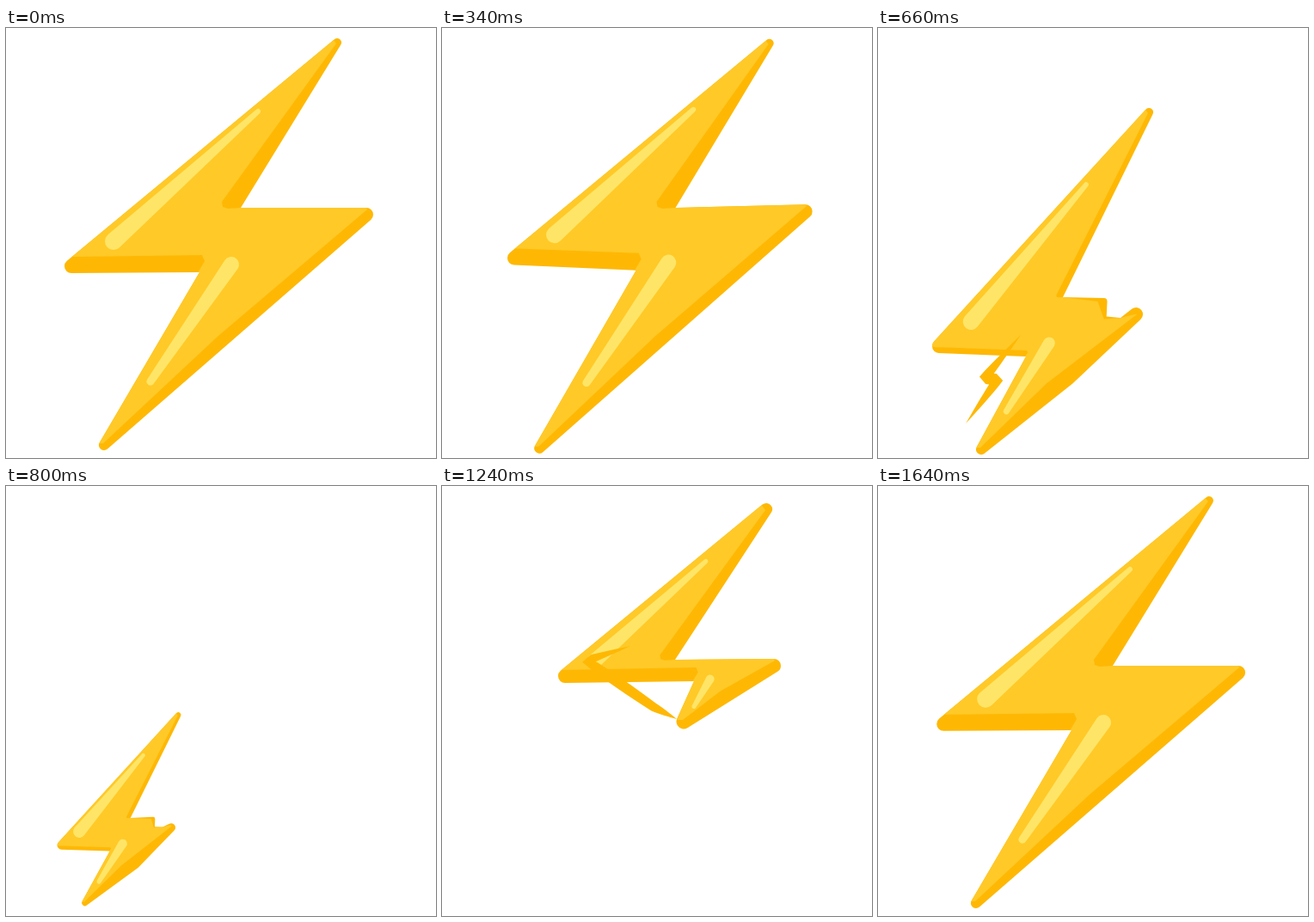
These frames come from a looping animation (500x500 px, 1660 ms). An HTML page with a canvas:

```html
<!DOCTYPE html>
<html lang="en">
<head>
<meta charset="utf-8">
<title>Lightning bolt</title>
<style>
  html, body { margin: 0; width: 100%; height: 100%; overflow: hidden; background: #fff; }
  canvas { display: block; width: 500px; height: 500px; }
</style>
</head>
<body>
<canvas id="stage" width="500" height="500"></canvas>
<script>
const ctx = document.getElementById('stage').getContext('2d');
const LOOP = 1660, STEP = 20, SPARK_LIFE = 200;
const DARK = '#feb804', BODY = '#ffc928', SHINE = '#ffe567';

const linear = p => p;
const easeIn = p => p * p;
const easeOut = p => 1 - (1 - p) * (1 - p);
const smooth = p => p * p * (3 - 2 * p);

const clamp = (v, a, b) => Math.max(a, Math.min(b, v));
const dist = (a, b) => Math.hypot(a[0] - b[0], a[1] - b[1]);
const add = ([x, y], dx, dy, r = 0) => [x + dx, y + dy, r];
const mix = (a, b, p) => Array.isArray(a) ? a.map((v, i) => mix(v, b[i], p)) : a + (b - a) * p;

// Pose: [size, tip, rim, bite], then top, notch, right, bottom, inner corner, left
const REST = [[1, 1, 1, 0], [385, 17], [273, 209], [419, 217], [114, 485], [225, 284], [76, 277]];

// Moves the corners of the resting bolt
const moved = (style, ...shifts) =>
  [style, ...shifts.map(([dx, dy], i) => add(REST[i + 1], dx, dy).slice(0, 2))];

// Shrinks a pose around its middle and puts that at a place
function shrunk([style, ...pts], place, k) {
  const mean = j => pts.reduce((sum, p) => sum + p[j], 0) / pts.length;
  const mid = [mean(0), mean(1)], s = Math.sqrt(k);
  return [[s, s * style[1], style[2], 0],
          ...pts.map(p => p.map((v, j) => place[j] + (v - mid[j]) * k))];
}

const SWAY = moved([1, 1, 1, 0], [-6, 1], [-2, 0], [5, -5], [-1, 5], [1, -3], [11, -13]);
const BACK = mix(REST, SWAY, .4);
const LEAVE = moved([1, 1, .35, 1], [-70, 81], [-58, 104], [-119, 116], [6, 5], [-53, 98], [-5, 93]);
const HALF = moved([1, 1.4, .8, 0], [-8, 10], [-2, -7], [-33, -8], [167, -211], [68, -57], [67, -56]);
const GONE = shrunk(LEAVE, [59, 475], .02);
const BUD = shrunk(HALF, [308, 95], .15);

// Each key: time, pose, easing on the way to it
const fall = [[0, REST], [200, SWAY, smooth], [500, BACK, smooth], [530, BACK, linear],
              [660, LEAVE, easeIn], [970, GONE, linear], [1000, GONE, linear]];
const rise = [[900, shrunk(HALF, [340, 60], 0)], [980, BUD, easeOut], [1240, HALF, linear],
              [1420, SWAY, easeOut], [LOOP, REST, smooth]];

// Sparks: middle time, width, bends
const sparks = [
  [180, 9, [325, 142], [286, 207], [312, 320], [283, 356]],
  [500, 14, [195, 200], [167, 214], [183, 248], [175, 303], [187, 328], [146, 385]],
  [660, 13, [166, 357], [123, 408], [140, 408], [102, 460]],
  [980, 9, [350, 32], [312, 52], [326, 74], [317, 123]],
  [980, 6, [396, 11], [394, 34], [369, 44]],
  [1240, 12, [219, 186], [168, 203], [246, 257], [273, 271]]
];

function poseAt(track, t) {
  if (t < track[0][0] || t > track[track.length - 1][0]) return null;
  let i = 1;
  while (t > track[i][0]) i++;
  const [t0, from] = track[i - 1], [t1, to, ease] = track[i];
  return mix(from, to, ease((t - t0) / (t1 - t0)));
}

// Outline around circles [x, y, r] given clockwise, joined by tangents
function outline(nodes) {
  const n = nodes.length;
  const normal = i => {
    const [x, y, r = 0] = nodes[i % n], [u, v, s = 0] = nodes[(i + 1) % n];
    const d = Math.hypot(u - x, v - y) || 1;
    return Math.atan2(v - y, u - x) - Math.acos(clamp((r - s) / d, -1, 1));
  };
  ctx.beginPath();
  nodes.forEach(([x, y, r = 0], i) => {
    if (r > 0) ctx.arc(x, y, r, normal(i + n - 1), normal(i));
    else ctx.lineTo(x, y);
  });
  ctx.closePath();
}

function shape(nodes, color) {
  outline(nodes);
  ctx.fillStyle = color;
  ctx.fill();
}

// Carries a point from triangle a to triangle b
function carrier([o, p, q], b) {
  const px = p[0] - o[0], py = p[1] - o[1], qx = q[0] - o[0], qy = q[1] - o[1];
  const det = px * qy - qx * py;
  return (x, y, r) => {
    const dx = x - o[0], dy = y - o[1];
    const u = (dx * qy - qx * dy) / det, v = (px * dy - py * dx) / det;
    const at = k => b[0][k] + u * (b[1][k] - b[0][k]) + v * (b[2][k] - b[0][k]);
    return [at(0), at(1), r];
  };
}

function bolt([[size, tip, rim, bite], T, N, R, B, I, L]) {
  const [, T0, N0, R0, B0, I0, L0] = REST;
  const near = (p, dx, dy) => add(p, dx * size, dy * size);
  const inner = (p, dx, dy) => near(p, dx * rim, dy * rim);

  // a bite out of the right arm, with its lower side bulging
  const bitten = bite > .02;
  const notch = (p, dx, dy) => add(mix(N, add(R, 0, -8 * (1 - bite)), p), dx * bite, dy * bite);
  const bump = notch(.5, 5, -5), dent = notch(.62, -2, 10), lip = notch(.8, -1, 8);
  const belly = [...mix(R, B, .45), 7.1 + 5 * bite];
  const arm = bitten ? [add(bump, 0, 0, 4 * bite), dent, lip] : [];
  const armLight = bitten ? [near(bump, -7 * bite, 0), near(dent, -3 * bite, 3 * bite), lip] : [];

  ctx.save();
  outline([[...T, 5 * tip], N, ...arm, [...R, 8 * size], ...(bitten ? [belly] : []),
           [...B, 6 * tip], I, [...L, 8 * size]]);
  ctx.fillStyle = DARK;
  ctx.fill();
  ctx.clip();

  const top = 8 - 19 * rim;
  shape([
    near(T, -8, -8), near(T, -1, 1), inner(N, -22, -7), inner(N, -21, -1), inner(N, -15, 1),
    N, ...armLight, near(R, -1, -11 * (1 - bite)), near(R, 1, -6 * (1 - bite)),
    near(mix(R, B, .55), -5, -6), near(B, -1, -2), near(B, -14, -2),
    near(I, -4, 4), inner(I, 6, -13), inner(I, 3, -20),
    near(L, 4, top), near(L, -4, top), near(L, -16, top - 4)
  ], BODY);

  const upper = carrier([L0, T0, N0], [L, T, N]);
  const lower = carrier([I0, R0, B0], [I, add(R, 10 * bite, -40 * bite), B]);
  const k1 = Math.sqrt(dist(T, L) / dist(T0, L0));
  const k2 = Math.sqrt(dist(R, B) / dist(R0, B0));
  shape([upper(125, 248, 10 * k1), upper(293, 97, 3 * k1)], SHINE);
  shape([lower(262, 275, 9 * k2), lower(168, 411, 4.5 * k2)], SHINE);
  ctx.restore();
}

// Small drop that joins the growing tip
function drop(t) {
  if (t < 920 || t > 1060) return;
  const k = clamp((t - 900) / 80, 0, 1);
  shape([[391, 5, 1.5 * k], [385, 24, 3 * k], [375, 29, 5 * k]], DARK);
  shape([[389, 7, k], [377, 25, 4 * k]], BODY);
  shape([[382, 15, k], [377, 23, 2 * k]], SHINE);
}

// A tapered zigzag that runs along its bends
function spark(t, [mid, width, ...pts]) {
  const p = (t - mid) / SPARK_LIFE + .5;
  if (p <= 0 || p >= 1) return;
  const from = Math.max(0, 2 * p - 1), to = Math.min(1, 2 * p);
  const last = pts.length - 1, n = 8 * last, left = [], right = [];
  const along = u => {
    const f = clamp(u, 0, 1) * last, i = Math.min(last - 1, Math.floor(f));
    return mix(pts[i], pts[i + 1], f - i);
  };
  for (let k = 0; k <= n; k++) {
    const u = from + (to - from) * k / n, [x, y] = along(u);
    const a = along(u - .02), b = along(u + .02);
    const w = width / 2 * Math.sin(Math.PI * k / n) / (dist(a, b) || 1);
    const nx = (b[1] - a[1]) * w, ny = (a[0] - b[0]) * w;
    left.push([x + nx, y + ny]);
    right.unshift([x - nx, y - ny]);
  }
  shape([...left, ...right], DARK);
}

function draw(now) {
  const t = Math.floor((now % LOOP) / STEP) * STEP;
  ctx.fillStyle = '#fff';
  ctx.fillRect(0, 0, 500, 500);
  for (const track of [fall, rise]) {
    const pose = poseAt(track, t);
    if (pose && pose[0][0] > 0) bolt(pose);
  }
  drop(t);
  sparks.forEach(s => spark(t, s));
}

const start = performance.now();
function loop() {
  draw(performance.now() - start);
  requestAnimationFrame(loop);
}
loop();
</script>
</body>
</html>
```
